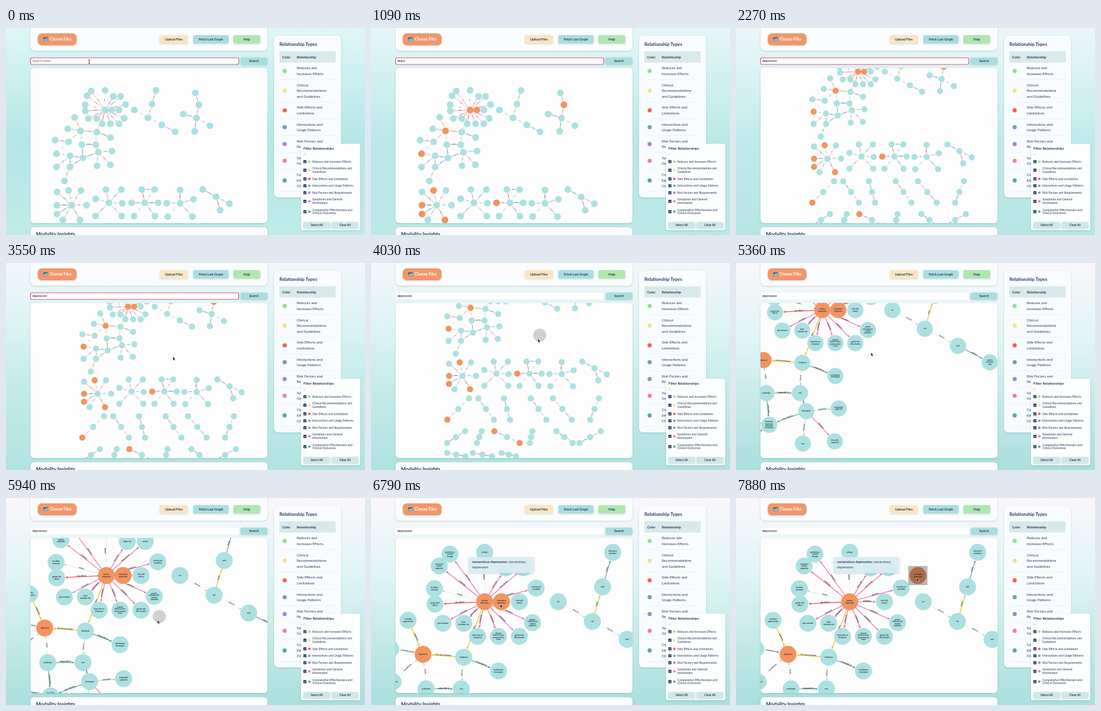
Recreate the animation shown at these times as an HTML page. Size 600x347 px, loop 7910 ms.

```html
<!DOCTYPE html>
<html lang="en">
<head>
<meta charset="utf-8">
<title>Relationship graph</title>
<style>
  html, body { margin: 0; width: 100%; height: 100%; overflow: hidden; }
  svg { display: block; width: 100vw; height: 100vh; }
  text { font-family: Lato, "Open Sans", sans-serif; fill: #26385c; }
  .b { font-weight: 700; }
  .mid { text-anchor: middle; }
  .field { font-family: "Liberation Sans", Arial, sans-serif; font-size: 5px; fill: #111; }
  .card { filter: drop-shadow(0 1px 1.5px rgba(40, 90, 100, .22)); }
  .node circle { fill: #ade0e0; }
  .found .hit circle { fill: #f2945f; }
  .node text { font-size: 2.9px; font-weight: 700; text-anchor: middle; fill: #1b3346; }
  .tag { font-size: 3.1px; font-weight: 700; text-anchor: middle; fill: #15181c; }
  .far .node text { display: none; }
</style>
</head>
<body>
<svg viewBox="0 0 600 347" preserveAspectRatio="none">
  <defs>
    <linearGradient id="cool" x2="0" y2="1">
      <stop stop-color="#dff6f7"/><stop offset=".55" stop-color="#b4e7e6"/><stop offset="1" stop-color="#c0ebe9"/>
    </linearGradient>
    <linearGradient id="warm" x2="0" y2="1">
      <stop stop-color="#fbf7fb"/><stop offset=".35" stop-color="#e1f5f6"/><stop offset="1" stop-color="#a9dfdc"/>
    </linearGradient>
    <clipPath id="pane"><rect x="41" y="67" width="396" height="260" rx="6"/></clipPath>
  </defs>
  <rect width="600" height="347" fill="url(#cool)"/>
  <rect id="glow" width="600" height="347" fill="url(#warm)"/>
  <g id="page"></g>
  <g clip-path="url(#pane)">
    <g id="graph"><g id="edges"></g><g id="nodes"></g></g>
    <circle id="press" r="11" fill="#000" opacity=".18"/>
  </g>
  <g id="tip" class="card">
    <rect x="163" y="99" width="110" height="27" rx="3" fill="#dcedf4" opacity=".95"/>
    <text x="169" y="109.3" font-size="5.7"><tspan class="b">nonanxious depression</tspan>: nonanxious</text>
    <text x="169" y="118.3" font-size="5.7">depression</text>
  </g>
  <g id="side"></g>
  <path id="arrow" d="M0 0V6.2L1.5 4.9 2.5 7.2 3.5 6.7 2.5 4.5H4.4Z" fill="#111" stroke="#fff" stroke-width=".5"/>
  <path id="beam" d="M137.6 53.2Q139 53.2 139 54.2Q139 53.2 140.4 53.2M139 54V58.6M137.6 59.4Q139 59.4 139 58.4Q139 59.4 140.4 59.4" fill="none" stroke="#222" stroke-width=".8"/>
</svg>
<script>
(() => {
const LOOP = 7910;
const $ = id => document.getElementById(id);

// Page furniture
const text = (x, y, s, size, cls = '') =>
  `<text x="${x}" y="${y}" font-size="${size}" class="${cls}">${s}</text>`;
const box = (x, y, w, h, r, fill, cls = '') =>
  `<rect x="${x}" y="${y}" width="${w}" height="${h}" rx="${r}" fill="${fill}" class="${cls}"/>`;
const dot = (x, y, r, fill) => `<circle cx="${x}" cy="${y}" r="${r}" fill="${fill}"/>`;
const button = (x, y, w, h, fill, s, size = 5.4) =>
  box(x, y, w, h, 3, fill, 'card') + text(x + w / 2, y + h / 2 + size * .35, s, size, 'b mid');

$('page').innerHTML =
  box(41, -12, 396, 50, 8, '#fbfcfe', 'card') +
  box(53, 9, 65, 20, 7, '#f0976b', 'card') +
  '<path d="M62 16.5L65 15.2 66 16.2 69.5 15V21.5L63.5 23Z" fill="#35566b"/>' +
  '<path d="M63.2 18.2L69.8 16.8 69 21.8 63.5 23Z" fill="#7fc0cf"/>' +
  '<text x="73" y="21.4" font-size="6.5" class="b" style="fill:#fff">Choose Files</text>' +
  button(257, 12, 47, 14, '#f9e5c0', 'Upload Files') +
  button(313, 12, 59, 14, '#a9dedd', 'Fetch Last Graph') +
  button(380, 12, 45, 14, '#afe7b0', 'Help') +
  '<rect id="field" x="41" y="50" width="348" height="11" rx="2.5" fill="#fff" stroke="#e2527e" stroke-width="1.2"/>' +
  '<text id="query" x="44" y="57.3" class="field"></text>' +
  button(392, 49.5, 45, 12, '#a9dedd', 'Search') +
  box(41, 67, 396, 260, 6, '#fdfdfe', 'card') +
  box(41, 334, 396, 30, 6, '#fbfcfe', 'card') +
  text(50, 349.3, 'Modality Insights', 8.6, 'b');

// Colour, wrapped name in the legend, wrapped name in the filter
const types = [
  ['#98dd98', 'Reduces and|Increases Effects', 'Reduces and Increases Effects'],
  ['#f7dd92', 'Clinical|Recommendations|and Guidelines', 'Clinical Recommendations and|Guidelines'],
  ['#f25f5c', 'Side Effects and|Limitations', 'Side Effects and Limitations'],
  ['#6fa0bf', 'Interactions and|Usage Patterns', 'Interactions and Usage Patterns'],
  ['#a584dd', 'Risk Factors and|Requirements', 'Risk Factors and Requirements'],
  ['#f07fae', 'Symptoms and|General Information', 'Symptoms and General|Information'],
  ['#5aa898', 'Comparative|Effectiveness and|Clinical Outcomes', 'Comparative Effectiveness and|Clinical Outcomes']
];

// Stacks rows whose height follows their number of lines
function stack(col, top, x, size, gap, pad, mark) {
  return types.map(row => {
    const lines = row[col].split('|');
    const height = lines.length * gap + pad, y = top + height / 2;
    top += height;
    return mark(row[0], y, top) + lines.map((s, i) =>
      text(x, y + (i - (lines.length - 1) / 2) * gap + size * .35, s, size)).join('');
  }).join('');
}

$('side').innerHTML =
  box(448, 13, 112, 271, 7, '#f8fcfe', 'card') +
  text(457, 30, 'Relationship Types', 7.6, 'b') +
  box(457, 39, 94, 19, 0, '#d9e9e9') +
  text(461.5, 50.5, 'Color', 5.7, 'b') + text(486, 50.5, 'Relationship', 5.9, 'b') +
  stack(1, 58, 486, 6.1, 9.5, 9.2, (c, y, end) => box(457, end, 94, .5, 0, '#dde6ea') + dot(465.7, y, 3.5, c)) +
  box(493, 194, 99, 145, 3, '#fdfefe', 'card') +
  text(497, 204.2, 'Filter Relationships', 6, 'b') +
  box(497, 211, 4, 1, .5, '#f0bd52') +
  stack(2, 218.2, 512, 4.95, 5.7, 5.9, (c, y) =>
    box(497, y - 2.6, 5.2, 5.2, .9, '#1f3a5f') +
    `<path d="M498.2 ${y}l1.1 1.2 1.9-2.5" fill="none" stroke="#fff" stroke-width=".8"/>` +
    dot(507, y, 2.1, c)) +
  button(497, 325, 44.5, 11, '#cfe7e7', 'Select All', 5) +
  button(544, 325, 45, 11, '#cfe7e7', 'Clear All', 5);

// Graph
const kinds = {
  thin: ['#8dbba6', .45], green: ['#93cf93', .7], gold: ['#efc637', 1.4], red: ['#e4585c', 1.3],
  blue: ['#6b97b8', 1.2], violet: ['#a07fd2', 1], pink: ['#e86aa6', 1.1], teal: ['#58a396', 1.2]
};
const RADIUS = 14.2;

function node([x, y, label = '', hit = false]) {
  const lines = label.split('|');
  const rows = lines.map((s, i) =>
    `<text y="${(i - (lines.length - 1) / 2) * 3.5 + 1}">${s}</text>`).join('');
  $('nodes').insertAdjacentHTML('beforeend',
    `<g class="node${hit ? ' hit' : ''}" transform="translate(${x} ${y})"><circle r="${RADIUS}"/>${rows}</g>`);
  return $('nodes').lastElementChild;
}

function edge(a, b, kind, label) {
  const [color, width] = kinds[kind];
  const dx = b[0] - a[0], dy = b[1] - a[1], len = Math.hypot(dx, dy);
  const turn = Math.atan2(dy, dx) * 180 / Math.PI;
  const flip = Math.abs(turn) > 90 ? 180 : 0;
  const end = len - RADIUS, head = 1.6 + width;
  $('edges').insertAdjacentHTML('beforeend',
    `<g transform="translate(${a[0]} ${a[1]}) rotate(${turn})">
      <path d="M0 0H${end - head}" stroke="${color}" stroke-width="${width}" ${kind === 'thin' ? 'stroke-dasharray="1 .8"' : ''}/>
      <path d="M${end} 0l${-head * 1.4} ${-head * .7}v${head * 1.4}z" fill="${color}"/>
      <text class="tag" transform="translate(${len / 2} 0) rotate(${flip})" y="-.4">${label}</text></g>`);
}

const words = ['treats', 'symptom', 'side effects', 'comparable', 'results', 'form of', 'reduces'];
const order = ['pink', 'blue', 'thin', 'teal', 'violet', 'red', 'green'];
let count = 0;
const link = (a, b) => edge(a, b, order[count % 7], words[count++ * 3 % 7]);

// Labelled networks: "key x y label", then "from to kind label"
function network(points, links) {
  const map = {};
  for (const row of points.trim().split('\n')) {
    const [key, x, y, ...label] = row.trim().split(' ');
    const name = label.join(' ');
    map[key] = [+x, +y, name, name.startsWith('dep') || name.endsWith('depression')];
  }
  for (const row of links.trim().split('\n')) {
    const [a, b, kind, ...label] = row.trim().split(' ');
    edge(map[a], map[b], kind, label.join(' '));
  }
  Object.values(map).reverse().forEach(node);
}

network(`
  hub 190 174 anxious|depression
  som 132 94 sensitivity to|somatic|changes
  sev 114 114 severity of|anxiety|symptoms
  sub 190 91 subtype
  rem 106 152 less likely|remission
  sid 107 178 greater side|effects
  out 120 210 poor outcome
  low 155 210 lower|remission rate
  les 178 232 lower time on|citalopram
  phy 213 232 physical|illness &amp; lower|socioeconomic|status
  bur 248 232 greater side|effect burden
  red 270 209 greater|reduction but|residual|symptoms
  mel 248 174 melt with|anxiety
  sui 276 151 severity and|suicidality
  ris 225 117 higher risk
  anx 255 117 anxiety
  cit 155 267 citalopram
  dep 87 262 depressed
  esc 213 290 escitalopram,|mirtazapine
  aug 62 205 sertraline|augmentation
  use 33 253 common
  bup -20 301 bupropion
  nef 37 308 nefazodone
  ven 92 320 venlafaxine
  ssr 151 320 ssris
  mir 162 352 mirtazapine
  ant 219 347 antagonistic|properties
  com 212 405 tetracyclic|compound
  nor 156 409 nora
  mix 97 376 fluoxetine,|bupropion,|paroxetine,|mirtazapine
  tri 43 367 tricyclics
  chr -14 358 depression
  mao -14 414 maois
  lit 43 414 lithium
  gui 19 473 guideline`, `
  hub som pink indicates
  hub sev pink definition
  hub sub thin results
  hub rem thin results
  hub sid red side effects
  hub out pink increased
  hub low pink associated
  hub les pink symptoms
  hub phy pink symptoms
  hub bur pink symptoms
  hub red pink symptom
  hub mel pink definition
  hub sui pink symptom
  hub ris pink more risk
  hub anx pink more severe
  hub cit gold high-dose
  cit dep gold first-line treatment
  cit esc teal comparable to
  aug dep gold augments
  use dep thin commonly used
  cit ssr thin class of
  ssr mir thin class of
  ven ssr teal comparable to
  ven dep thin treats
  ven mix teal comparable
  mir mix teal more effective
  mir ant green properties
  mir com pink definition
  mir nor green increases
  mix tri blue compared
  tri chr thin treats
  tri mao pink symptom
  lit mix teal comparable
  tri lit violet risk
  bup nef pink symptom
  nef dep thin not effective
  chr nef thin treats
  gui lit gold guideline`);

network(`
  ect 313 174 ect
  vtd 370 207 vtd
  cut 428 237 cutd
  mdd 387 149 mdd
  act 404 91 behavioral|activation
  rel 484 266 relief to|persistent|mdd`, `
  ect vtd thin form of
  vtd cut thin form of
  vtd mdd gold treats
  mdd act blue treats
  cut rel blue used for`);

// Star: the ends of the spokes lie on a square around the centre
function star(x, y, angles, isHit = () => false, half = 56) {
  const ends = angles.map((deg, i) => {
    const c = Math.cos(deg * Math.PI / 180), s = Math.sin(deg * Math.PI / 180);
    const r = half / Math.max(Math.abs(c), Math.abs(s));
    return [x + r * c, y + r * s, '', isHit(i)];
  });
  ends.forEach(p => link([x, y], p));
  [[x, y], ...ends].forEach(node);
  return ends;
}

const tail = [569, 102];
link(star(574, 208, [280, 197, 30, 98], i => i === 0)[0], tail);
node(tail);
star(50, 575, [222, 258, 302, 180, 0, 149, 121, 61], i => i % 2 === 1, 62);
star(206, 565, [197, 257, 313, 2, 135, 46]);
link(...star(357, 565, [257, 306, 180, 0, 129, 53], i => i === 2));
star(505, 567, [270, 180, 343, 47, 133]);
star(656, 540, [209, 27, 73]);

// Rows of short chains below, each drifting sideways by its own step
function chains(y, dy, starts, drifts, isHit) {
  starts.forEach((x, n) => {
    let last;
    for (let i = 0; i < 3; i++) {
      const p = [x + i * drifts[n], y + i * dy, '', isHit(n, i)];
      if (last) link(last, p);
      node(last = p);
    }
  });
}
chains(679, 49, [80, 122, 240, 363, 465, 676], [-50, 36, 14, 36, 43, -20], (n, i) => n === 0 && i === 2);
chains(830, 27, [61, 138, 196, 371, 481, 685], [-41, -11, 58, -6, 37, -49], (n, i) => n === 2 && i !== 1);
chains(930, 8, [-21, 97, 229], [42, 44, 33], () => false);

const loose = node([218, 174, 'nonanxious|depression', true]);
loose.insertAdjacentHTML('beforeend',
  '<rect x="-16" y="-16" width="32" height="32" opacity=".28"/>');
const shade = loose.lastElementChild;

// Motion: each move is [start, end, ...goal] and holds until the next one
const smooth = p => p * p * (3 - 2 * p);
const linear = p => p;
function follow(home, moves, t) {
  let now = home;
  for (const [a, b, ...goal] of moves) {
    if (t <= a) break;
    const p = Math.min(1, (t - a) / (b - a));
    const q = (goal.length === 3 && goal[0] !== now[0] ? linear : smooth)(p);
    now = now.map((v, i) => v + (goal[i] - v) * q);
  }
  return now;
}
// Camera goals are zoom, pan x, pan y
const camera = [
  [1700, 2250, .364, 134.8, 9.8],
  [3650, 4030, .364, 134.8, -20.2],
  [4060, 4330, .364, 123.6, 60.4],
  [4450, 4820, .547, 73.7, 14.4],
  [4820, 5360, .952, -36.7, -86.7],
  [5360, 5450, 1, -49.9, -98.8],
  [5700, 6150, 1, 0, 0]
];
const pointer = [
  [2500, 3300, 279, 157],
  [3650, 4030, 279, 127],
  [4060, 4330, 268, 207],
  [4330, 4450, 223, 152],
  [4820, 5360, 225.5, 150],
  [5700, 6150, 275.5, 249],
  [6150, 6480, 216, 178],
  [7390, 7880, 302, 134]
];
const drag = [[7390, 7880, 304, 130]];
const show = (el, on) => el.style.display = on ? '' : 'none';
const within = (t, a, b) => t >= a && t < b;
const move = (el, [x, y]) => el.setAttribute('transform', `translate(${x} ${y})`);

function draw(t) {
  const typed = 'depression'.slice(0, Math.max(0, Math.floor((t - 610) / 95)));
  $('query').textContent = typed || 'Search nodes...';
  $('query').style.fill = typed ? '#111' : '#666';
  $('field').style.stroke = t < 3650 ? '' : 'none';
  $('glow').style.opacity = Math.min(1, t / 5400);

  const [k, x, y] = follow([.398, 90, 68.2], camera, t);
  $('graph').setAttribute('transform', `translate(${x} ${y}) scale(${k})`);
  $('graph').setAttribute('class', (typed.length > 2 ? 'found ' : '') + (k < .7 ? 'far' : ''));

  const [px, py] = follow([139, 56], pointer, t);
  move($('arrow'), [px, py]);
  move($('press'), [px + 3, py - 6]);
  show($('arrow'), t >= 2500);
  show($('beam'), t < 600);
  show($('press'), within(t, 3650, 4330) || within(t, 5700, 6150));

  move(loose, follow([218, 174], drag, t));
  show(shade, t >= 7390);
  show($('tip'), t >= 6500);
}

const start = performance.now();
function tick() {
  draw((performance.now() - start) % LOOP);
  requestAnimationFrame(tick);
}
tick();
})();
</script>
</body>
</html>
```
